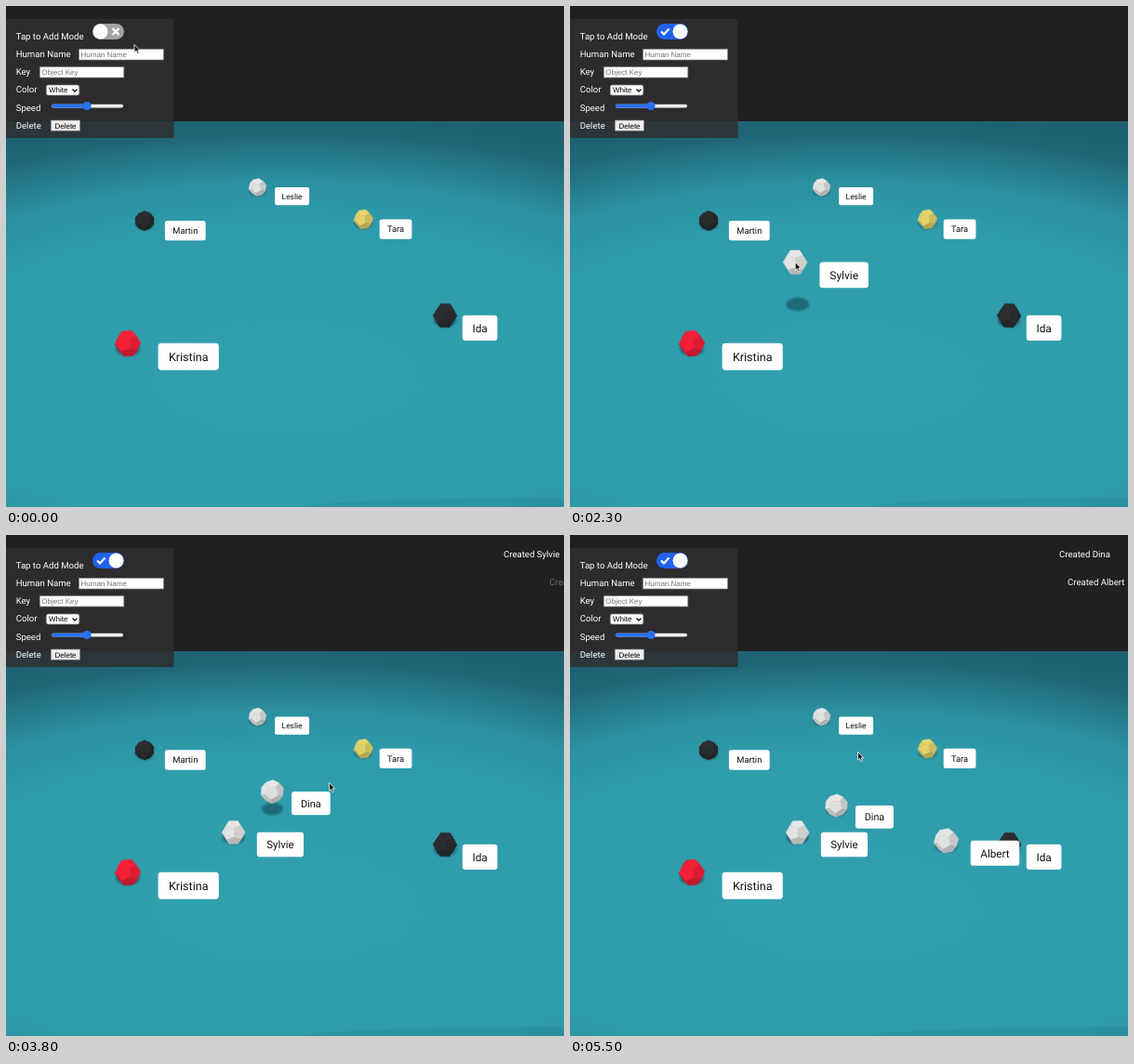
These frames come from a looping animation (600x539 px, 5.6 s). An HTML page:

```html
<!DOCTYPE html>
<html lang="en">
<head>
<meta charset="utf-8">
<title>Tap to add</title>
<style>
  html, body { margin: 0; width: 100%; height: 100%; overflow: hidden; background: #221f21; }
  svg { display: block; width: 600px; height: 539px; }
  text { font-family: Roboto, "Liberation Sans", sans-serif; text-rendering: geometricPrecision; }
  #controls text { font-family: "Liberation Sans", Arial, sans-serif; }
</style>
</head>
<body>
<svg viewBox="0 0 600 539">
  <defs>
    <radialGradient id="light" gradientUnits="userSpaceOnUse" cx="0" cy="0" r="1.2"
      gradientTransform="translate(300 400) scale(570 240)">
      <stop offset="0" stop-color="#309fae"/>
      <stop offset=".58" stop-color="#2f9cab"/>
      <stop offset=".73" stop-color="#2b90a0"/>
      <stop offset=".83" stop-color="#257b8b"/>
      <stop offset=".91" stop-color="#1f6777"/>
      <stop offset="1" stop-color="#1d6070"/>
    </radialGradient>
    <filter id="soft" x="-40%" y="-60%" width="180%" height="220%">
      <feGaussianBlur stdDeviation="1.3"/>
    </filter>
  </defs>
  <rect width="600" height="539" fill="#221f21"/>
  <rect id="floor" width="600" height="416" fill="url(#light)"/>
  <path d="M318 539Q350 530 600 529V539Z" fill="#155563" opacity=".1"/>
  <g id="shadows" fill="#124a58" opacity=".62"></g>
  <g id="balls"></g>
  <g id="labels"></g>

  <rect y="14" width="180.500" height="128" fill="#2f2e30" fill-opacity=".86"/>
  <g id="captions" font-size="9.6" fill="#fff"></g>
  <g id="controls" font-size="8">
    <rect id="pill" x="93" y="19" width="34" height="17" rx="8.5"/>
    <path id="check" d="M98 27.500l3 3l5.500-6" fill="none" stroke="#fff" stroke-width="2.2"/>
    <path id="cross" d="M114.500 24l7 7m0-7l-7 7" fill="none" stroke="#fff" stroke-width="2.2"/>
    <circle id="knob" cy="27.500" r="8" fill="#fff"/>
    <g fill="#fff" stroke="#858585" stroke-width=".7">
      <rect x="78.500" y="46.300" width="91" height="11.700"/>
      <rect x="36.300" y="65.500" width="90.500" height="11.500"/>
      <rect x="43.300" y="85" width="35.500" height="11" rx="2"/>
      <rect x="48.300" y="123" width="31.200" height="11.200" fill="#efefef"/>
    </g>
    <text x="80.500" y="55" fill="#757575">Human Name</text>
    <text x="38.300" y="74.200" fill="#757575">Object Key</text>
    <text x="46" y="93.400">White</text>
    <text x="64" y="131.500" text-anchor="middle">Delete</text>
    <path d="M71.500 89.500l2.500 2.500l2.500-2.500" fill="none" stroke="#111" stroke-width="1.300"/>
    <rect x="49" y="105.700" width="77" height="3.800" rx="1.900" fill="#efefef"/>
    <rect x="49" y="105.700" width="38" height="3.800" rx="1.900" fill="#2672f2"/>
    <circle cx="87" cy="107.500" r="4.600" fill="#2672f2"/>
  </g>
  <g id="toasts" font-size="9.6" fill="#fff"></g>
  <path id="cursor" d="M0 0V8.500L2 6.700L3.500 10L5 9.300L3.600 6.200H6.200Z" fill="#111" stroke="#fff" stroke-width=".8"/>
</svg>
<script>
const LOOP = 5600, STEP = 100, FALL = 500;
const TILT = .6, LIGHT = [-.4, .85, .3];
const PAINT = {
  white: [232, 232, 232], black: [44, 45, 47], yellow: [232, 214, 108], red: [250, 32, 56]
};
const $ = id => document.getElementById(id);

function set(el, attrs) {
  for (const k in attrs) el.setAttribute(k, attrs[k]);
}
function add(parent, tag, attrs, text) {
  const el = document.createElementNS("http://www.w3.org/2000/svg", tag);
  set(el, attrs);
  if (text) el.textContent = text;
  parent.appendChild(el);
  return el;
}
const clamp = v => Math.max(0, Math.min(1, v));
const ramp = (t, from, length) => clamp((t - from) / length);
const ease = p => p * p * (3 - 2 * p);
const lerp = (a, b, p) => a + (b - a) * p;
const dot = (a, b) => a.reduce((s, v, i) => s + v * b[i], 0);

// Face normals of a dodecahedron that rests on one face.
function faceNormals(spin) {
  const up = 1 / Math.sqrt(5), out = 2 * up, list = [[0, 1, 0]];
  for (let i = 0; i < 5; i++) {
    const a = spin + i * Math.PI * 2 / 5;
    list.push([out * Math.cos(a), up, out * Math.sin(a)]);
  }
  return list.concat(list.map(n => n.map(v => -v)));
}

// Seen from above at TILT; a corner is where three neighbouring faces meet.
function solid(paint, spin) {
  const g = add($("balls"), "g", {});
  const cos = Math.cos(TILT), sin = Math.sin(TILT);
  const faces = faceNormals(spin).map(n => ({
    lit: dot(n, LIGHT),
    view: [n[0], sin * n[2] - cos * n[1], sin * n[1] + cos * n[2]]
  }));
  for (const { lit, view: n } of faces.filter(f => f.view[2] > 0)) {
    const angle = v => Math.atan2(v[1] - n[1] * .447, v[0] - n[0] * .447);
    const near = faces.map(f => f.view)
      .filter(v => Math.abs(dot(v, n) - .447) < .01)
      .sort((a, b) => angle(a) - angle(b));
    const points = near.map((a, i) => {
      const sum = n.map((v, k) => v + a[k] + near[(i + 1) % 5][k]);
      const size = Math.hypot(...sum);
      return [sum[0] / size, sum[1] / size];
    });
    const fill = `rgb(${PAINT[paint].map(v => Math.round(v * (.82 + .2 * lit)))})`;
    add(g, "polygon", { points: points.join(" "), fill, stroke: fill, "stroke-width": .03 });
  }
  return g;
}

class Human {
  constructor(name, paint, x, y, spin, born = -FALL) {
    Object.assign(this, { name, x, y, born, r: 9.4 + (y - 195) * .0275 });
    this.shadow = add($("shadows"), "ellipse", { filter: "url(#soft)" });
    this.ball = solid(paint, spin);
    this.tag = add($("labels"), "g", {});
    const box = add(this.tag, "rect", { y: -11.5, height: 23, rx: 2.7, fill: "#fff" });
    const text = add(this.tag, "text", { y: 3.6, "font-size": 10, "text-anchor": "middle", fill: "#111" }, name);
    this.width = text.getComputedTextLength() + 18;
    set(box, { x: -this.width / 2, width: this.width });
  }

  // Lifted things come nearer to the camera, so they grow and spread.
  pose(lift) {
    const zoom = 1 + .045 * lift;
    return { x: lerp(300, this.x, zoom), y: this.y - 3.45 * this.r * lift, r: this.r * zoom };
  }

  draw(t, drift) {
    const shown = t >= this.born ? "" : "none";
    for (const el of [this.shadow, this.ball, this.tag]) el.style.display = shown;
    const fallen = ramp(t, this.born, FALL) ** 2;
    const { x, y, r } = this.pose(1 - fallen);
    const sway = drift * clamp((300 - this.y) / 176);
    const scale = r * 2.06 / 23;
    set(this.ball, { transform: `translate(${x} ${y + sway}) scale(${r * 1.03})` });
    set(this.tag, { transform: `translate(${x + this.width * scale} ${y + sway + r * 1.02}) scale(${scale})` });
    set(this.shadow, { cx: this.x, cy: this.y + sway + 1 + fallen * r * .35, rx: r * .92, ry: r * .54 });
  }
}

const residents = [
  new Human("Leslie", "white", 270.5, 195, .5),
  new Human("Martin", "black", 149, 231, .3),
  new Human("Tara", "yellow", 384.3, 229.5, .7),
  new Human("Ida", "black", 472, 333, 1),
  new Human("Kristina", "red", 131, 363, .8)
];
const guests = [
  new Human("Sylvie", "white", 244.7, 320, .9, 2300),
  new Human("Dina", "white", 286.5, 291, .4, 3400),
  new Human("Albert", "white", 404.5, 329, .6, 4400)
];
const toasts = guests.map(h => add($("toasts"), "text", {}, "Created " + h.name));

["Tap to Add Mode", "Human Name", "Key", "Color", "Speed", "Delete"].forEach((text, i) =>
  add($("captions"), "text", { x: 10.7, y: 35.7 + 19.2 * i }, text));

// The pointer flips the switch, then waits at each spot where a guest appears.
const stops = [
  { x: 138, y: 41.5, from: 0, to: 0 },
  { x: 113, y: 30, from: 400, to: 800 },
  { x: 136, y: 30, from: 900, to: 900 },
  ...guests.map(h => ({ ...h.pose(1), from: h.born - 300, to: h.born + 100 })),
  { x: 375.5, y: 277.5, from: 4900, to: 4900 },
  { x: 309.5, y: 233.5, from: 5500, to: LOOP }
];
function pointer(t) {
  const i = stops.findIndex(s => t <= s.to);
  const b = stops[i], a = stops[i - 1] || b;
  const p = i ? ease(ramp(t, a.to, b.from - a.to)) : 1;
  return [lerp(a.x, b.x, p), lerp(a.y, b.y, p)];
}

function drawToast(el, i, t) {
  const age = t - guests[i].born;
  const left = guests.slice(0, i).reduce((n, h) => n + ease(ramp(t, h.born + 2600, 400)), 0);
  const enter = ramp(age, 350, 150);
  set(el, {
    x: 606 - 65 * enter - 6 * ramp(age, 500, 300) - 9 * ease(ramp(age, 1500, 300)),
    y: 24.4 + 30 * (i - left),
    opacity: enter * (1 - ramp(age, 2100, 400))
  });
}

function drawSwitch(on) {
  const color = [163, 163, 163].map((v, i) => Math.round(lerp(v, [33, 98, 236][i], on)));
  set($("pill"), { fill: `rgb(${color})` });
  set($("knob"), { cx: 101.5 + 17 * on });
  set($("check"), { opacity: on });
  set($("cross"), { opacity: 1 - on });
}

function draw(t) {
  const drift = ramp(t, 2600, 1200);
  set($("floor"), { y: 124 + drift });
  for (const h of [...residents, ...guests]) h.draw(t, drift);
  toasts.forEach((el, i) => drawToast(el, i, t));
  drawSwitch(ramp(t, 500, 300));
  set($("cursor"), { transform: `translate(${pointer(t)})` });
}

const start = performance.now();
function tick() {
  const t = (performance.now() - start) % LOOP;
  draw(Math.floor(t / STEP) * STEP);
  requestAnimationFrame(tick);
}
tick();
</script>
</body>
</html>
```
